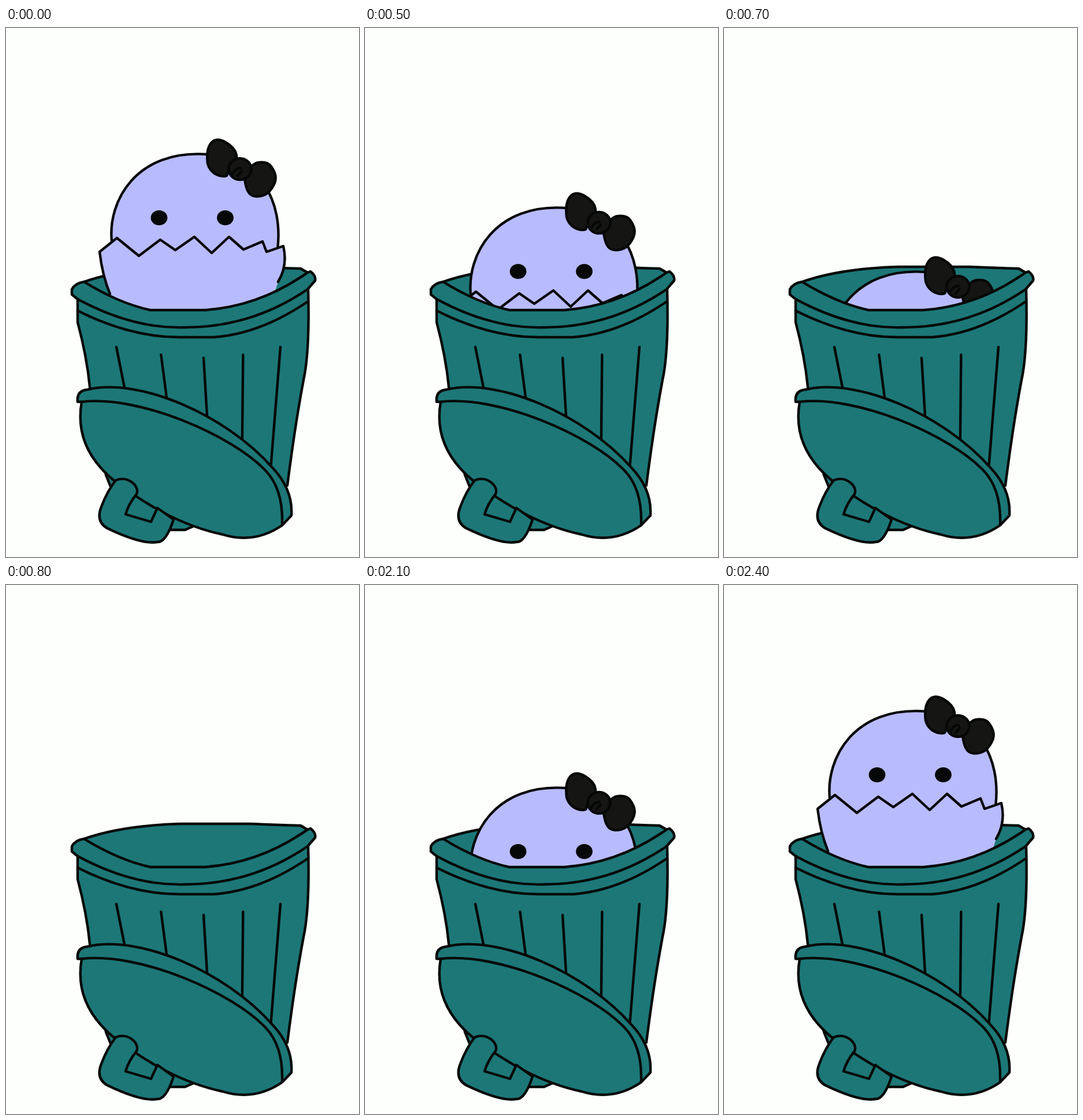
Write an HTML page that moves like this. It is 611 px wide and 917 px high and loops after 2.5 s.

```html
<!DOCTYPE html>
<html lang="en">
<head>
<meta charset="utf-8">
<title>Peekaboo bin</title>
<style>
  html, body { margin: 0; height: 100%; overflow: hidden; background: #fdfffd; }
  svg { display: block; stroke: #050807; stroke-width: 4.4; stroke-linecap: round; stroke-linejoin: round; }
  .teal { fill: #1d7777; }
  .lilac { fill: #b9bbff; }
  .bow { fill: #151513; }
  .line { fill: none; }
  .bare { stroke: none; }
</style>
</head>
<body>
<svg width="611" height="917" viewBox="0 0 611 917">
  <path class="teal" d="M135 440Q195 477 250 489H345Q440 482 522 424L510 417Q470 416 425 414H300Q200 417 135 440Z"/>

  <g id="creature">
    <path class="lilac" d="M190 430L183 370C176 300 225 210 349 219C440 225 480 300 470 384L465 430Z"/>
    <path class="lilac bare" d="M162 388L192 364L230 395L267 367L293 385L326 362L356 390L386 362L411 384L444 370L451 388L480 378Q488 412 471 440L455 490H200L180 461Q167 430 162 388Z"/>
    <path class="line" d="M180 461Q167 430 162 388L192 364L230 395L267 367L293 385L326 362L356 390L386 362L411 384L444 370L451 388L480 378Q488 412 471 440"/>
    <g fill="#050807" class="bare">
      <ellipse cx="265" cy="329" rx="14.4" ry="13"/>
      <ellipse cx="379.5" cy="329" rx="14.4" ry="13"/>
    </g>
    <g class="bow">
      <path d="M349 235C345 203 358 185 380 198S404 228 391 240 388 257 377 257 353 250 349 235Z"/>
      <path d="M424 242C430 230 452 230 459 240S470 260 463 273 448 292 433 292 415 275 413 262Z"/>
      <ellipse cx="405" cy="244.500" rx="19.500" ry="18.500"/>
      <path d="M391 254Q398 242 406 243M401 256L408 248"/>
    </g>
  </g>

  <g class="teal">
    <path d="M124 470V510Q140 570 145 622L173 775L183 800L200 870H310L328 862L487 793Q500 690 515 610Q526 560 523 451L515 455L310 515L135 470Z"/>
    <path id="ridges"/>
    <path class="line" d="M124 490Q215 536 300 536H360Q440 530 521 475"/>
    <path d="M135 440Q195 477 250 489H345Q440 482 522 424L527 422Q537 430 535 438L522 453Q425 519 310 519Q220 522 124 470L114 462V453Q120 442 135 440Z"/>
    <path d="M131 648H124Q122 629 140 627C230 605 380 670 461 762Q497 800 494 845L478 862Q430 895 375 878C300 862 240 824 190 787C150 755 120 710 131 648Z"/>
    <path class="line" d="M131 648C230 636 392 706 450 768Q480 800 478 861"/>
    <path d="M290 852Q277 892 262 891Q235 896 175 867Q155 855 165 830Q175 803 190 784C212 775 232 795 226 808Q212 825 207 843L251 856L262 832Z"/>
  </g>
</svg>
<script>
const creature = document.getElementById('creature');

// Five ridges fan out along a shallow arch and run down behind the lid.
let ridges = '';
for (let i = 0; i < 5; i++) {
  const arch = Math.sin(Math.PI * i / 4);
  ridges += `M${191 + 71 * i + 9 * arch} ${553 + 19 * arch}l${44 - 15.4 * i} 220`;
}
document.getElementById('ridges').setAttribute('d', ridges);

// Sinks from 400 ms, is hidden from 800 ms, rises again from 2000 ms.
const DROPS = [53, 93, 133, 204];

function frame() {
  const tick = Math.floor(performance.now() % 2500 / 100);
  const step = tick < 20 ? tick - 4 : 23 - tick;
  const drop = step < 0 ? 0 : DROPS[step];
  creature.setAttribute('visibility', step < DROPS.length ? 'visible' : 'hidden');
  creature.setAttribute('transform', `translate(0 ${drop || 0})`);
  requestAnimationFrame(frame);
}
frame();
</script>
</body>
</html>
```
